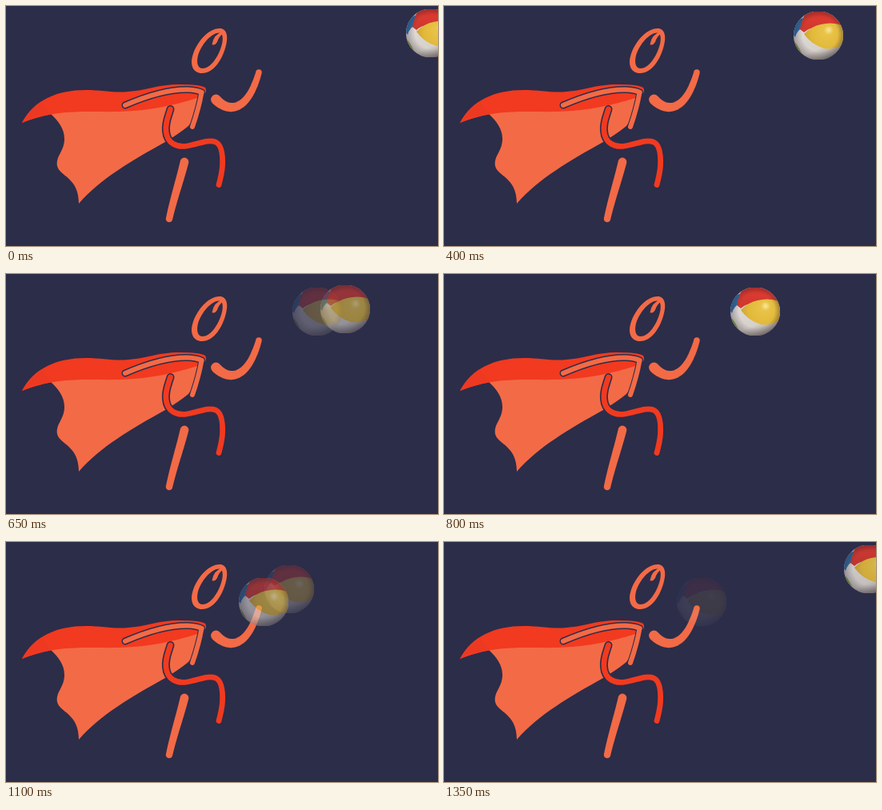
These frames come from a looping animation (540x300 px, 1400 ms). An HTML page with a canvas:

```html
<!DOCTYPE html>
<html lang="en">
<head>
<meta charset="utf-8">
<title>Caped runner and beach ball</title>
<style>
html, body { margin: 0; width: 100%; height: 100%; overflow: hidden; background: #2c2d49; }
canvas { display: block; }
</style>
</head>
<body>
<canvas id="stage" width="540" height="300"></canvas>
<script>
const W = 540, H = 300, STEP = 50, HOLD = 200;
const NAVY = '#2c2d49', ORANGE = '#f36a46', RED = '#f13a20';
const stops = [[531, 34], [507, 34], [468, 37], [424, 44], [389, 47], [354, 59], [322, 75]];
const LOOP = HOLD * stops.length;
const ctx = document.getElementById('stage').getContext('2d');

function layer(paint, w = W, h = H) {
  const c = document.createElement('canvas');
  c.width = w;
  c.height = h;
  paint(c.getContext('2d'));
  return c;
}

function fill(g, d, color, rule = 'nonzero') {
  g.fillStyle = color;
  g.fill(new Path2D(d), rule);
}

function stroke(g, d, color, width) {
  g.strokeStyle = color;
  g.lineWidth = width;
  g.lineCap = g.lineJoin = 'round';
  g.stroke(new Path2D(d));
}

// Round brush along a cubic curve, width changing from w0 to w1.
function limb(g, p, w0, w1) {
  const path = new Path2D();
  for (let i = 0; i <= 120; i++) {
    const t = i / 120, u = 1 - t;
    const at = k => u * u * u * p[k] + 3 * u * u * t * p[k + 2] + 3 * u * t * t * p[k + 4] + t * t * t * p[k + 6];
    const x = at(0), y = at(1), r = (w0 + (w1 - w0) * t) / 2;
    path.moveTo(x + r, y);
    path.arc(x, y, r, 0, Math.PI * 2);
  }
  g.fillStyle = ORANGE;
  g.fill(path);
}

function paintBall(g) {
  g.translate(31, 30);
  g.beginPath();
  g.ellipse(0, 0, 31, 30.5, 0, 0, Math.PI * 2);
  g.clip();
  const white = g.createLinearGradient(-10, -10, 6, 31);
  white.addColorStop(0, '#dedad8');
  white.addColorStop(0.65, '#d6d1cb');
  white.addColorStop(1, '#8f8985');
  g.fillStyle = white;
  g.fillRect(-31, -31, 62, 62);
  fill(g, 'M-32 -2 L-27 -20 L-19 -22 L-20 -9 Q-26 -8 -29 2Z', '#2a6fa8');
  fill(g, 'M-32 6 Q-27 9 -21 22 L-25 25 L-32 14Z', '#7fa046');
  const red = g.createLinearGradient(0, -31, 0, -10);
  red.addColorStop(0, '#c9302a');
  red.addColorStop(0.5, '#da3a30');
  red.addColorStop(1, '#d0382e');
  fill(g, 'M-23 -8 Q-21 -20 -14 -32 L20 -32 L31 -10 L-2 -10 Q-12 -10 -18 -4Z', red);
  const yellow = g.createRadialGradient(12, -7, 2, 8, 0, 29);
  yellow.addColorStop(0, '#eac64c');
  yellow.addColorStop(0.6, '#e2b93a');
  yellow.addColorStop(1, '#c79c31');
  fill(g, 'M-18 -2 Q-8 -12 3 -14 Q18 -18 32 -12 L31 11 Q20 18 7 16 Q-9 11 -18 -2Z', yellow);
  const glow = g.createRadialGradient(13, -7, 0, 13, -7, 6);
  glow.addColorStop(0, 'rgba(255,238,170,.8)');
  glow.addColorStop(1, 'rgba(255,238,170,0)');
  g.fillStyle = glow;
  g.fillRect(7, -13, 12, 12);
  const rim = g.createRadialGradient(2, -2, 22, 0, 0, 32);
  rim.addColorStop(0, 'rgba(50,35,45,0)');
  rim.addColorStop(1, 'rgba(50,35,45,.38)');
  g.fillStyle = rim;
  g.fillRect(-31, -31, 62, 62);
}

function paintRunner(g) {
  g.fillStyle = NAVY;
  g.fillRect(0, 0, W, H);

  // Cape
  fill(g, 'M45 120 Q50 128 55 134 C66 144 73 154 73 166 C73 182 62 187 64 200 C67 213 91 214 91 247 ' +
    'C118 216 156 194 199 170 Q217 159 228 150 L233 143 L247 108 L150 112Z', ORANGE);
  const fold = 'M20 146 C35 118 63 105 100 105 C120 105 137 109 153 107 C180 105 188 98 218 98 ' +
    'Q242 98 249 102 Q252 106 247 112 L239 115 C211 124 180 131 142 132 C101 133 65 128 20 146Z';
  fill(g, fold, RED);
  g.save();
  g.clip(new Path2D(fold));
  fill(g, 'M15 100 L32 100 L45 120 L57 135 L15 150Z', '#ee3922');
  g.restore();

  // Rear arm and torso
  const arm = 'M149 124 C172 114 203 104 227 104.500 Q239 105 244.500 108';
  const torso = 'M244.500 108 Q241 128 233 151';
  stroke(g, arm, NAVY, 9);
  stroke(g, torso, NAVY, 8);
  stroke(g, arm, ORANGE, 6);
  stroke(g, torso, ORANGE, 6);

  // Raised leg
  const leg = 'M205.500 129 C203 138 199 145 200 156 C201 172 214 177 226 175 ' +
    'C240 173 252 166 262 170 C271 174 271 190 270.500 200 C270 208 268 216 266 223.500';
  stroke(g, leg, NAVY, 10);
  stroke(g, leg, RED, 6.8);

  limb(g, [223, 195, 217, 219, 209, 243, 204, 266], 10.8, 8.5);
  limb(g, [262.5, 117, 280, 135, 303, 130, 316, 83], 12.8, 7.5);

  // Head
  fill(g, 'M267 28 C276 28 278 38 275 49 C271 66 260 84 245 84 C234 84 230 74 233 63 C238 45 253 28 267 28Z ' +
    'M267 33.500 C272 34 271.500 44 269 51 C264 67 254 78 246 78 C239 78 238 70 240 62 C245 46 258 33 267 33.500Z',
    ORANGE, 'evenodd');
  fill(g, 'M273 30 Q259 36 257.500 48 Q261 50 264 45 Q266 38 273 33Z', ORANGE);
}

const ball = layer(paintBall, 62, 60);
const runner = layer(paintRunner);

function drawBall(index, alpha) {
  const [x, y] = stops[index % stops.length];
  ctx.globalAlpha = alpha;
  ctx.drawImage(ball, x - 31, y - 30);
  ctx.globalAlpha = 1;
}

function draw() {
  const time = Math.floor(performance.now() % LOOP / STEP) * STEP;
  const index = Math.floor(time / HOLD);
  const phase = time % HOLD / HOLD;
  ctx.drawImage(runner, 0, 0);
  drawBall(index, (1 - phase) ** 1.7);
  drawBall(index + 1, Math.min(1, phase * 1.2));
  requestAnimationFrame(draw);
}
draw();
</script>
</body>
</html>
```
